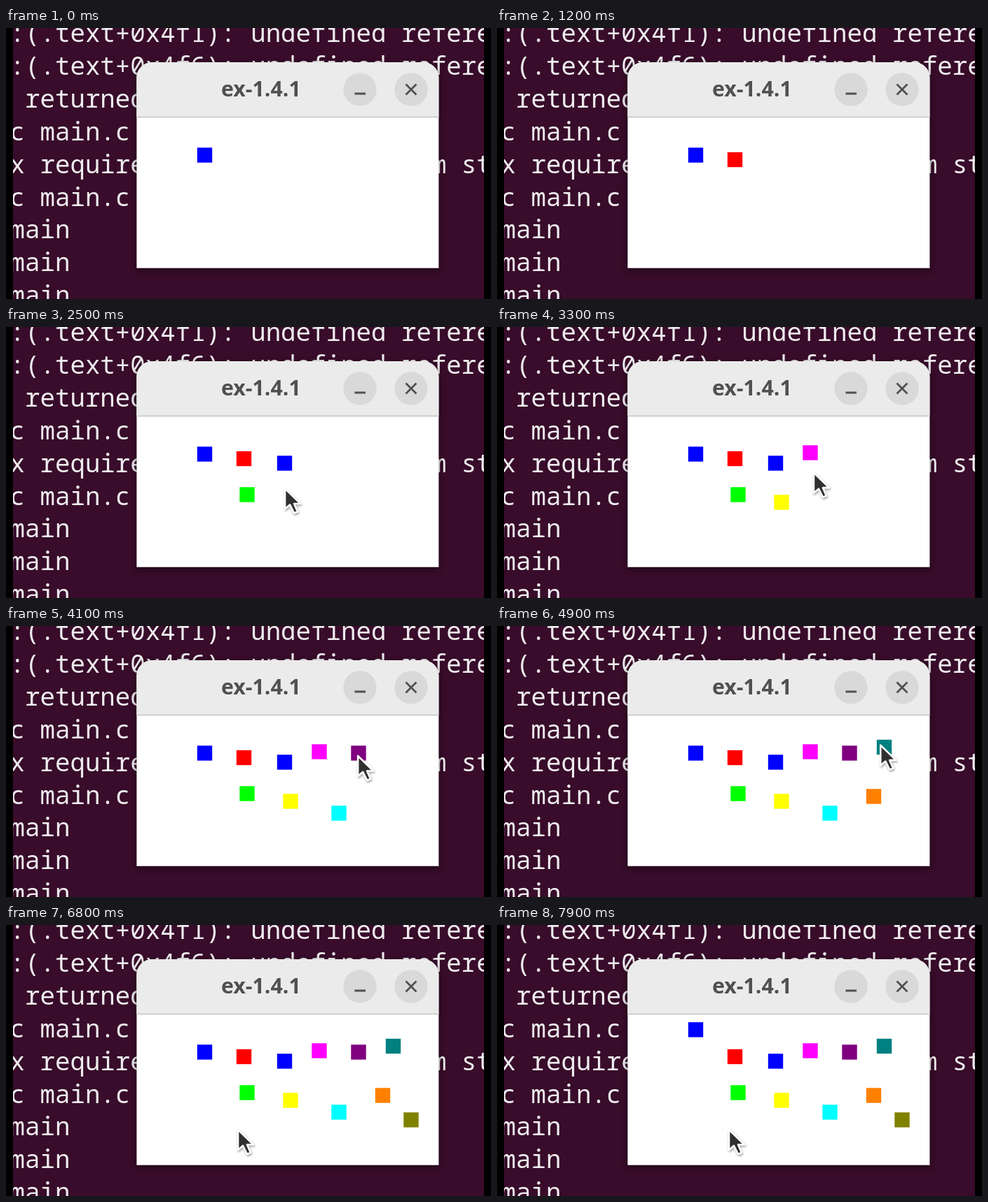
Write an HTML page that moves like this. It is 692 by 388 pixels and loops after 8000 ms.

```html
<!DOCTYPE html>
<html lang="en">
<head>
<meta charset="utf-8">
<style>
  html, body { margin: 0; width: 100%; height: 100%; overflow: hidden; background: #000; }
  svg { display: block; }
  .term { font: 35.8px "Noto Sans Mono", monospace; fill: #eeecee; }
  .title { font: bold 30.3px "Open Sans", sans-serif; fill: #505050; }
  #window { filter: drop-shadow(0 3px 5px rgba(0, 0, 0, .5)); }
  #cursor { filter: drop-shadow(1px 2px 1.5px rgba(0, 0, 0, .35)); }
</style>
</head>
<body>
<svg width="692" height="388" viewBox="0 0 692 388">
  <clipPath id="screen"><path d="M10 0H682V388H10Z"/></clipPath>
  <g clip-path="url(#screen)">
    <path d="M10 0H682V388H10Z" fill="#380c2a"/>
    <g id="lines" class="term"></g>
    <g id="window">
      <path d="M186.400 343.700V71a22 22 0 0 1 22-22H595.400a22 22 0 0 1 22 22V343.700Z" fill="#fff"/>
      <path d="M186.400 128V71a22 22 0 0 1 22-22H595.400a22 22 0 0 1 22 22V128Z" fill="#ebebeb"/>
      <path d="M186.400 127.500H617.400" stroke="#c4c4c4" stroke-width="1.6"/>
      <text class="title" x="307" y="98">ex-1.4.1</text>
      <g fill="#d9d9d9"><circle cx="505" cy="88" r="23.7"/><circle cx="578" cy="88" r="23.7"/></g>
      <path d="M497.500 94H513M570.500 80.500l15 15m0-15l-15 15" stroke="#505050" stroke-width="2.8"/>
    </g>
    <g id="squares"></g>
    <path id="cursor" d="M2 3V32L9 26L15 38L20 36L15 24.500H24Z" fill="#303030" stroke="#fff" stroke-width="2.600" stroke-linejoin="round"/>
  </g>
</svg>
<script>
const LOOP = 8000, STEP = 100, SIZE = 21.4, CELL = 10.7;
const FIRST_CLICK = 1200, PACE = 455;
const $ = id => document.getElementById(id);

function add(parent, tag, attrs) {
  const el = document.createElementNS("http://www.w3.org/2000/svg", tag);
  for (const key in attrs) el.setAttribute(key, attrs[key]);
  return parent.appendChild(el);
}

const lines = [
  ":(.text+0x4f1): undefined refere",
  ":(.text+0x4f6): undefined refere",
  " returned",
  "c main.c",
  "x require" + " ".repeat(19) + "m st",
  "c main.c",
  "main", "main", "main"
];
lines.forEach((text, i) => {
  const line = add($("lines"), "text", { x: 5.5, y: 20 + 46.9 * i });
  line.textContent = text.replaceAll(" ", "\u00a0");
});

// centre and colour, in click order; the first is there from the start
const squares = [
  [283.5, 182, "blue"], [339.5, 188.5, "red"], [344, 240, "lime"], [397.5, 195, "blue"],
  [406, 251, "yellow"], [447, 180, "magenta"], [475, 268, "cyan"], [503, 182, "purple"],
  [537.5, 244, "#ff8000"], [552.5, 173.5, "teal"], [578, 279, "olive"]
].map(([cx, cy, fill], i) => {
  const x = cx - SIZE / 2, y = cy - SIZE / 2;
  const el = add($("squares"), "rect", { x, y, width: SIZE, height: SIZE, fill });
  return { x, y, el, start: i ? FIRST_CLICK + (i - 1) * PACE : 0 };
});

// the pointer visits each square's corner on its click, then leaves
const path = [
  ...squares.slice(1).map(s => [s.start, s.x + 3, s.y + 3]),
  [5900, 252, 278], [6000, 252, 278], [6400, 329, 290], [LOOP, 329, 290]
];

function tipAt(t) {
  const i = Math.max(1, path.findIndex(p => p[0] >= t));
  const [t0, x0, y0] = path[i - 1], [t1, x1, y1] = path[i];
  const k = ((t - t0) / (t1 - t0)) ** 2;
  return [x0 + (x1 - x0) * k, y0 + (y1 - y0) * k];
}

// cells the first square has climbed
const climbed = t => t < 7100 ? 0 : t < 7600 ? 1 : t < 7900 ? 4 : 3;

function draw(now) {
  const t = Math.floor(now % LOOP / STEP) * STEP;
  for (const s of squares) s.el.setAttribute("visibility", t >= s.start ? "visible" : "hidden");
  squares[0].el.setAttribute("y", squares[0].y - climbed(t) * CELL);
  $("cursor").setAttribute("visibility", t > FIRST_CLICK ? "visible" : "hidden");
  $("cursor").setAttribute("transform", `translate(${tipAt(Math.max(t, FIRST_CLICK))})`);
  requestAnimationFrame(draw);
}
requestAnimationFrame(draw);
</script>
</body>
</html>
```
